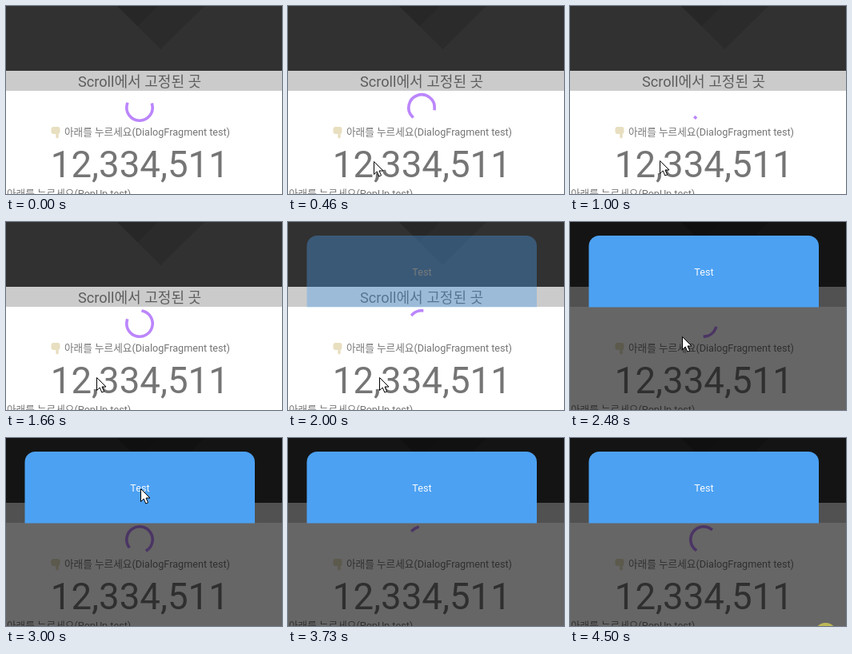
An HTML page that plays this animation: 345 px wide and 235 px high, repeating every 4560 ms.

```html
<!DOCTYPE html>
<html lang="ko">
<head>
<meta charset="utf-8">
<title>Dialog test</title>
<style>
html, body { margin: 0; width: 100%; height: 100%; overflow: hidden; background: #fff; }
svg { display: block; width: 345px; height: 235px; }
text { font-family: Roboto, "Noto Sans CJK KR", "Noto Sans CJK", "Noto Sans CJK SC", sans-serif; font-size: 12.63px; fill: #000; fill-opacity: .54; }
.mid { text-anchor: middle; }
.bar { font-size: 18.1px; }
.count { font-size: 45.6px; }
#dialog text { fill: #fff; fill-opacity: .95; }
</style>
</head>
<body>
<svg viewBox="0 0 345 235">
  <rect width="345" height="235" fill="#fff"/>
  <rect width="345" height="81" fill="#313131"/>
  <path d="M139 0L193.5 54L248 0Z" fill="#2b2b2b"/>
  <path d="M139 0L164.5 25L190 0Z" fill="#272727"/>
  <rect y="81" width="345" height="25" fill="#cbcbcb"/>
  <text class="mid bar" x="167.2" y="100.7">Scroll에서 고정된 곳</text>
  <path id="arc" fill="none" stroke="#bb86fc" stroke-width="3.6" stroke-linecap="square"/>
  <g fill="#e8dfc0">
    <rect x="56.5" y="151" width="11" height="9" rx="3"/>
    <rect x="62.3" y="154" width="3.4" height="11.5" rx="1.7"/>
  </g>
  <text x="73" y="162.2">아래를 누르세요(DialogFragment test)</text>
  <text class="mid count" x="167.3" y="214">12,334,511</text>
  <text x="1" y="239.2">아래를 누르세요(PopUp test)</text>
  <rect id="dim" width="345" height="235" opacity="0"/>
  <g id="dialog" opacity="0">
    <path d="M23.5 106.5V30a13 13 0 0 1 13-13H298a13 13 0 0 1 13 13V106.5Z" fill="#4ca1f3"/>
    <text class="mid" x="167.5" y="67">Test</text>
  </g>
  <circle id="spot" cx="319.5" cy="245" r="14" fill="#bdb856" visibility="hidden"/>
  <path id="cursor" d="M.5 .5V16.5L4.2 13L6.8 19L9.6 17.8L7 12H12Z" fill="#fff" stroke="#000" stroke-linejoin="round" visibility="hidden"/>
</svg>
<script>
const LOOP = 4560, STEP = LOOP / 68, CYCLE = 1323;
const CX = 167, CY = 127, R = 16.2;

// Cursor stops: time in ms, x, y
const stops = [
  [130, 263, 206], [530, 97, 193], [1000, 112, 193], [1300, 100, 192], [1740, 114, 194], [2260, 114, 194],
  [2740, 174, 79], [2880, 74, 88], [3010, 168, 63], [3340, 150, 31], [3640, 298, 234]
];

const $ = id => document.getElementById(id);
const arc = $('arc'), dim = $('dim'), dialog = $('dialog'), spot = $('spot'), cursor = $('cursor');

const clamp = k => Math.min(1, Math.max(0, k));
const ramp = (t, from, to) => clamp((t - from) / (to - from));
const smooth = k => k * k * (3 - 2 * k);
const show = (el, on) => el.setAttribute('visibility', on ? 'visible' : 'hidden');

// Cubic Bezier through x0..x3, with y running 0, 0, 1, 1
function ease(x, x0, x1, x2, x3) {
  let lo = 0, hi = 1;
  for (let i = 0; i < 24; i++) {
    const u = (lo + hi) / 2, v = 1 - u;
    const bx = v * v * v * x0 + 3 * v * v * u * x1 + 3 * v * u * u * x2 + u * u * u * x3;
    if (bx < x) lo = u; else hi = u;
  }
  return smooth(hi);
}

function point(deg) {
  const a = deg * Math.PI / 180;
  return `${(CX + R * Math.sin(a)).toFixed(3)} ${(CY - R * Math.cos(a)).toFixed(3)}`;
}

// Indeterminate ring: steady turn, head runs ahead, tail catches up
function spin(t) {
  const turns = .25 + t / CYCLE, p = turns % 1;
  const base = 216 * turns + 90 * p;
  const tail = base + 270 * ease(p, .5, .7, .6, 1);
  const head = Math.max(base + 270 * ease(p, 0, .2, .1, .5), tail + 1);
  arc.setAttribute('d', `M${point(tail)}A${R} ${R} 0 ${head - tail > 180 ? 1 : 0} 1 ${point(head)}`);
}

function moveCursor(t) {
  const i = Math.max(1, stops.findIndex(s => s[0] > t));
  const [t0, x0, y0] = stops[i - 1], [t1, x1, y1] = stops[i];
  const k = smooth(ramp(t, t0, t1));
  const x = Math.round(x0 + (x1 - x0) * k), y = Math.round(y0 + (y1 - y0) * k);
  cursor.setAttribute('transform', `translate(${x} ${y})`);
  show(cursor, t > stops[0][0] && t < stops[stops.length - 1][0]);
}

function draw(ms) {
  const t = Math.min(67, Math.floor(ms / STEP + .4)) * STEP;
  spin(t);
  moveCursor(t);
  dim.setAttribute('opacity', .6 * (1 - (1 - ramp(t, 2015, 2210)) ** 2));
  dialog.setAttribute('opacity', ramp(t, 1940, 2140));
  show(spot, t > 4400);
}

const start = performance.now();
function tick() {
  draw((performance.now() - start) % LOOP);
  requestAnimationFrame(tick);
}
tick();
</script>
</body>
</html>
```
